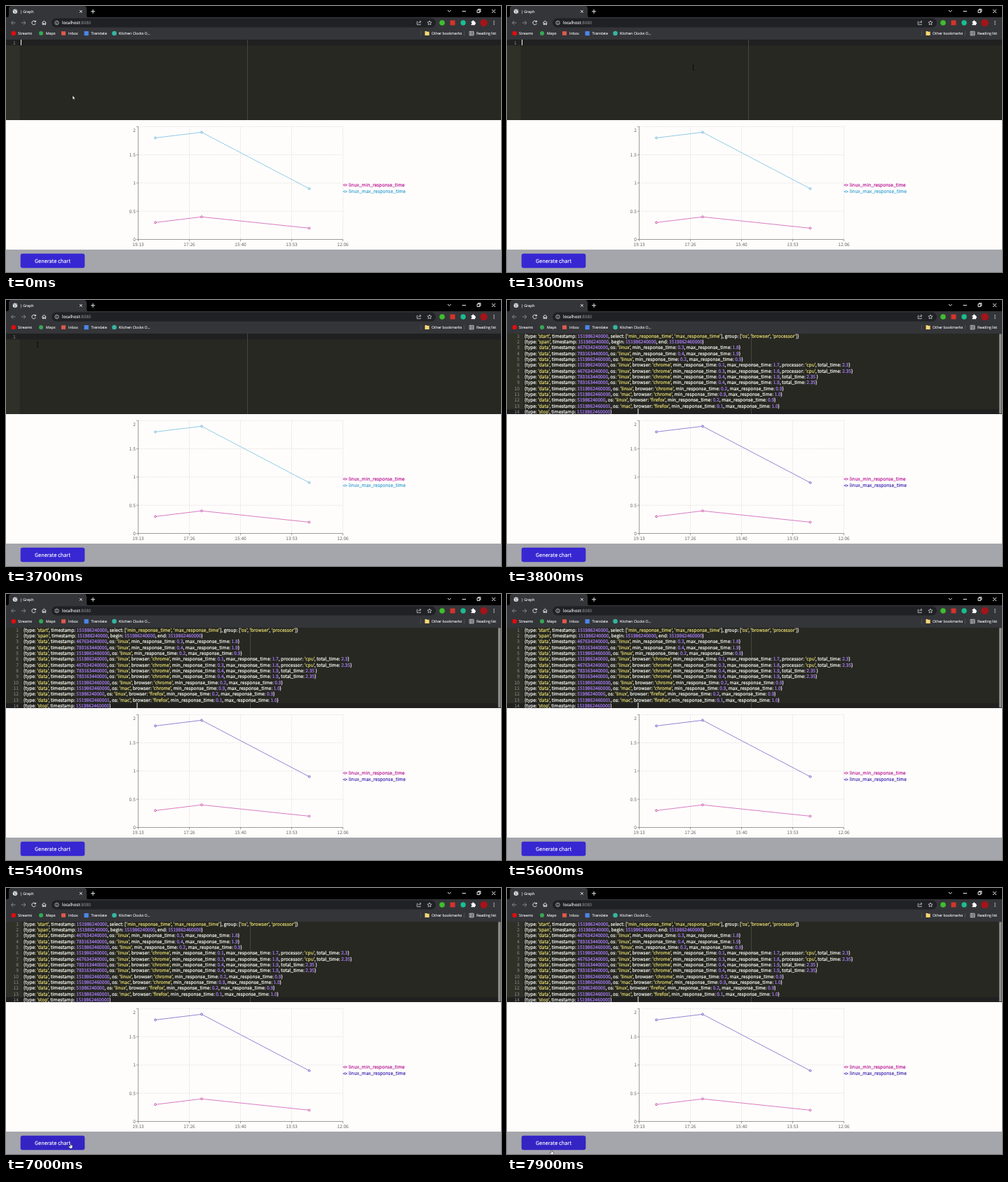
These frames come from a looping animation (706x380 px, 8000 ms). An HTML page:

```html
<!DOCTYPE html>
<html lang="en">
<head>
<meta charset="utf-8">
<title>Graph</title>
<style>
html, body { margin: 0; width: 100%; height: 100%; overflow: hidden; background: #000; }
svg { display: block; width: 100%; height: 100%; }
text { white-space: pre; text-rendering: geometricPrecision; }
.ui { font: 5.25px "Open Sans", "Noto Sans", sans-serif; fill: #f0f1f3; stroke: #f0f1f3; stroke-width: .12; }
.app { font: 6.58px "Noto Sans CJK JP", "Noto Sans CJK SC", "Noto Sans CJK", "Noto Sans", sans-serif; }
#code { stroke-width: .2; }
.icon { fill: none; stroke: #e8e9eb; stroke-width: 1; }
</style>
</head>
<body>
<svg id="stage" viewBox="0 0 706 380">
  <rect width="706" height="380" fill="#000"/>
  <!-- browser -->
  <path d="M0 16H2Q4 16 4 13V4Q4 0 8 0H111Q115 0 115 4V13Q115 16 117 16H706V48H0Z" fill="#343539"/>
  <rect x="65" y="17.5" width="548" height="13" rx="6.5" fill="#202124"/>
  <g class="ui" id="labels"></g>
  <circle cx="13" cy="7.8" r="3.3" fill="#e4e5e8"/>
  <path d="M10.5 6l2 1 .5 2-1 1.5M13.5 5l1 1.5 1.5.5M14 9l1.2 1" fill="none" stroke="#55575c" stroke-width=".8"/>
  <g class="icon">
    <path d="M105 6l3.6 3.6M108.600 6l-3.600 3.600M121 7.800h6M124 4.800v6"/>
    <path d="M630 6l2.300 2.300 2.300-2.300M650.500 7.500h5.500M672 5.800h3.700v3.700h-3.700zM673.300 5.800v-1.300h3.600v3.700h-1.200M693 5l5 5M698 5l-5 5"/>
    <path d="M13.500 24H7.500M10.300 21.200L7.500 24l2.800 2.800M22 24h6M25.200 21.200L28 24l-2.800 2.800" stroke="#85878c"/>
    <path d="M42 22.400A2.800 2.800 0 1 0 42.300 25M42.400 20.800v2h-2M51.300 24l3-2.700 3 2.700M52.200 23.600v3h1.400v-1.700h1.400v1.700h1.400v-3"/>
    <circle cx="72.500" cy="24" r="2.700" stroke-width=".7"/>
    <path d="M72.500 23.700v1.800M72.500 22.400v.7" stroke-width=".7"/>
    <path d="M587.500 22.300h-1.300v4.400h5v-1.200M588 24.800q.4-2.300 3.700-2.300M590.200 20.900l1.800 1.600-1.800 1.600" stroke-width=".7"/>
    <path d="M604 21l.9 2 2.200.2-1.700 1.500.5 2.200-1.900-1.200-1.900 1.200.5-2.200-1.700-1.500 2.200-.2z" stroke-width=".7"/>
  </g>
  <circle cx="622" cy="24" r="3.800" fill="#3fbe2e"/>
  <rect x="633.500" y="20.500" width="7" height="7" fill="#d3342c"/>
  <circle cx="652" cy="24" r="3.700" fill="#19bd91"/>
  <path d="M663.500 22h1.700a1.100 1.100 0 1 1 2.100 0h1.700v1.600a1.100 1.100 0 1 1 0 2.200v1.500h-5.500v-1.500a1.100 1.100 0 1 0 0-2.200z" fill="#fff"/>
  <circle cx="681.500" cy="24" r="5.200" fill="#a41419"/>
  <g fill="#e8e9eb"><circle cx="696" cy="21.700" r=".7"/><circle cx="696" cy="24" r=".7"/><circle cx="696" cy="26.300" r=".7"/></g>
  <circle cx="10.800" cy="39" r="3.200" fill="#e00d0d"/>
  <circle cx="50" cy="39" r="3" fill="#35a853"/>
  <rect x="79" y="36.200" width="6" height="5.600" fill="#e2584d"/>
  <rect x="111.500" y="36" width="6.200" height="6.200" fill="#4a86e8"/>
  <circle cx="154.500" cy="39" r="3.300" fill="#35b5a0"/>
  <path d="M591.500 35.500v7M653.500 35.500v7" stroke="#5d5f64" stroke-width=".6"/>
  <path d="M597.500 36h2.500l.6.800h3v5.200h-6.100z" fill="#f7d774"/>
  <path d="M661 36.300h6v5.600h-6zM662.800 36.300v5.600M662.800 38.200h4.200M662.800 40.100h4.200" class="icon" style="stroke-width:.7"/>
  <!-- editor -->
  <svg y="48" width="706" height="115" viewBox="0 48 706 115">
    <rect y="48" width="706" height="115" fill="#272822"/>
    <rect id="gutter" y="48" height="115" fill="#2f3129"/>
    <rect id="active" width="706" height="8.300" fill="#202020"/>
    <rect id="margin" y="48" width="1" height="115" fill="#45463f"/>
    <g class="app" id="empty"></g>
    <g class="app" id="code"></g>
    <rect id="caret" width="1" height="8.300" fill="#f8f8f0"/>
    <g id="bar"><rect x="701.500" y="48" width="4.500" height="115" fill="#3a3b38"/><rect x="702" y="48.500" width="3.500" height="113.500" rx="1" fill="#8c8c8a"/></g>
  </svg>
  <!-- page -->
  <rect y="163" width="706" height="185" fill="#fefdfc"/>
  <g class="app" id="chart"></g>
  <rect y="348" width="706" height="32" fill="#a5a6ab"/>
  <rect id="button" x="20.700" y="353.700" width="91.600" height="20.600" rx="3"/>
  <text class="app" x="66.500" y="367.100" text-anchor="middle" fill="#fff" stroke="#fff" stroke-width=".1" style="font-size:7.400px">Generate chart</text>
  <!-- pointers -->
  <path id="arrow" d="M0 0V5.400L1.300 4.300 2.100 6.200 3 5.800 2.200 4H3.800Z" fill="#fff" stroke="#111" stroke-width=".4"/>
  <path id="beam" d="M-1.300-3.500H1.300M0-3.500V3.500M-1.300 3.500H1.300" fill="none" stroke="#080808" stroke-width=".7"/>
  <path id="hand" d="M-.6-3.200Q0-3.800.6-3.200V-.8L2.700-.2Q3.200 0 3 .8L2.400 4H-1.200L-2.900 1Q-2.600.2-1.600.8L-.6 1.400Z" fill="#fff" stroke="#111" stroke-width=".5"/>
</svg>
<script>
const $ = id => document.getElementById(id);
const LOOP = 8000, PASTE = 3800, LINE = 8.33;

function add(parent, tag, attrs, text) {
  const el = document.createElementNS('http://www.w3.org/2000/svg', tag);
  for (const k in attrs) el.setAttribute(k, attrs[k]);
  if (text !== undefined) el.textContent = text;
  parent.appendChild(el);
  return el;
}
const set = (id, attrs) => { for (const k in attrs) $(id).setAttribute(k, attrs[k]); };
const show = (id, on) => set(id, { visibility: on ? 'visible' : 'hidden' });

// Browser labels
[[20, 9.8, '| Graph'], [17, 41, 'Streams'], [57, 41, 'Maps'], [89, 41, 'Inbox'], [121.5, 41, 'Translate'],
 [161, 41, 'Kitchen Clocks O...'], [607, 41, 'Other bookmarks'], [671, 41, 'Reading list']
].forEach(([x, y, s]) => add($('labels'), 'text', { x, y }, s));
const url = add($('labels'), 'text', { x: 80, y: 26.2, style: 'font-size:6.1px' });
add(url, 'tspan', {}, 'localhost');
add(url, 'tspan', { fill: '#9aa0a6', stroke: 'none' }, ':8080');

// Editor content
const row = (time, os, browser, min, max, rest = '') =>
  `{type: 'data', timestamp: ${time}, os: '${os}', ${browser ? `browser: '${browser}', ` : ''}` +
  `min_response_time: ${min}, max_response_time: ${max}${rest}}`;
const A = '151986240000', B = '1519862460000', C = '467634240000', D = '783163440000';
const lines = [
  `{type: 'start', timestamp: ${A}, select: ['min_response_time', 'max_response_time'], group: ['os', 'browser', 'processor']}`,
  `{type: 'span', timestamp: ${A}, begin: ${A}, end: ${B}}`,
  row(C, 'linux', '', '0.3', '1.8'),
  row(D, 'linux', '', '0.4', '1.9'),
  row(B, 'linux', '', '0.2', '0.9'),
  row(A, 'linux', 'chrome', '0.1', '1.7', ", processor: 'cpu', total_time: 2.3"),
  row(C, 'linux', 'chrome', '0.3', '1.8', ", processor: 'cpu', total_time: 2.35"),
  row(D, 'linux', 'chrome', '0.4', '1.9', ', total_time: 2.35 '),
  row(D, 'linux', 'chrome', '0.4', '1.9', ', total_time: 2.35'),
  row(B, 'linux', 'chrome', '0.2', '0.9'),
  row(B, 'mac', 'chrome', '0.9', '1.0'),
  row('51986240000', 'linux', 'firefox', '0.2', '0.9'),
  row('1519862460001', 'mac', 'firefox', '0.1', '1.0'),
  `{type: 'stop', timestamp: ${B}}`
];
const number = (parent, x, y, n) =>
  add(parent, 'text', { x, y, fill: '#8f908a', 'text-anchor': 'end' }, n);
const colour = s => s[0] === "'" ? '#e6db74' : /^\d/.test(s) ? '#ae81ff' : '#f8f8f2';

number($('empty'), 13.6, 54.7, 1);
lines.forEach((line, i) => {
  const y = 53.7 + i * LINE;
  number($('code'), 17.8, y, i + 1);
  const text = add($('code'), 'text', { x: 25, y });
  for (const s of line.match(/'[^']*'|\d[\d.]*|[^'\d]+/g))
    add(text, 'tspan', { fill: colour(s), stroke: colour(s) }, s);
});

// Chart
const chart = $('chart'), X0 = 188.5, X1 = 480.5, Y0 = 333.5, UNIT = 80.6;
const py = v => Y0 - v * UNIT;
const stroke = (d, color, extra) =>
  add(chart, 'path', { d, fill: 'none', stroke: color, 'stroke-width': .6, ...extra });
const dash = { 'stroke-dasharray': '1.4 1.4' };
const times = ['19:13', '17:26', '15:40', '13:53', '12:06'];

for (let i = 0; i < 5; i++) {
  const x = X0 + i * 73, v = i / 2;
  stroke(`M${x} ${py(2)}V${Y0}`, '#cfcdcb', dash);
  stroke(`M${X0} ${py(v)}H${X1}`, '#cfcdcb', dash);
  stroke(`M${x} ${Y0}v2.7M${X0} ${py(v)}h-2.700`, '#666');
  add(chart, 'text', { x, y: 342.7, fill: '#666', 'text-anchor': 'middle' }, times[i]);
  add(chart, 'text', { x: 185, y: v === 2 ? 179.6 : py(v) + 2.500, fill: '#666', 'text-anchor': 'end' }, v);
}
stroke(`M${X0} ${py(2)}V${Y0}H${X1}`, '#666');

function series(name, values, color, legendY) {
  const pts = [213, 279, 432.5].map((x, i) => [x, py(values[i])]);
  const dot = ([x, y]) => add(chart, 'circle',
    { cx: x, cy: y, r: 1.4, fill: '#fff', stroke: color, 'stroke-width': .7 });
  stroke('M' + pts.join('L'), color, { 'stroke-width': .55 });
  pts.forEach(dot);
  stroke(`M480.500 ${legendY}h6.400`, color, { 'stroke-width': .9 });
  dot([483.7, legendY]);
  add(chart, 'text', { x: 488.7, y: legendY + 2.2, fill: color, stroke: color, 'stroke-width': .15 }, name);
}
series('linux_min_response_time', [.3, .4, .2], '#b8108f', 255.8);
series('linux_max_response_time', [1.8, 1.9, .9], 'var(--max)', 265.1);

// Pointer way points: time, x, y
const path = [
  [0, 95, 128], [100, 95, 131], [600, 95, 131], [1300, 265.5, 88], [1500, 265.5, 88], [1700, 254, 69],
  [2000, 200, 66], [2400, 45, 63.5], [4300, 45, 63.5], [5400, 329, 151], [6000, 329, 151],
  [6300, 289, 162], [7000, 92, 368], [7900, 63.5, 377.5], [LOOP, 63.5, 377.5]
];
function pointer(t) {
  const i = Math.max(1, path.findIndex(p => p[0] > t));
  const [a, x, y] = path[i - 1], [b, u, v] = path[i];
  const k = (t - a) / (b - a), e = k * k * (3 - 2 * k);
  return [x + (u - x) * e, y + (v - y) * e];
}

const within = (t, a, b) => t >= a && t < b;
function caretOn(t) {
  if (t < PASTE) return t < 700 || within(t, 1100, 1600) || within(t, 2100, 2700) || within(t, 3100, 3700);
  return t < 4100 || (t - 400) % 1000 < 600;
}

function draw(t) {
  const full = t >= PASTE;
  show('code', full);
  show('bar', full);
  show('empty', !full);
  set('gutter', { width: full ? 23 : 19.4 });
  set('active', { y: full ? 47.7 + 13 * LINE : 48 });
  set('margin', { x: full ? 348 : 344 });
  set('caret', { x: full ? 186.5 : 21, y: full ? 155 : 47.8 });
  show('caret', caretOn(t));
  chart.style.setProperty('--max', full ? '#3a22ad' : '#38a0d2');

  const [x, y] = pointer(t);
  const hover = x > 20 && x < 113 && y > 354;
  const shape = hover ? 'hand' : t < 100 || y > 163 ? 'arrow' : 'beam';
  for (const id of ['arrow', 'beam', 'hand']) show(id, id === shape);
  set(shape, { transform: `translate(${x} ${y})` });
  set('button', { fill: hover ? '#3424c4' : '#3727d2' });
}

let start;
function tick(now) {
  start ??= now;
  draw((now - start) % LOOP);
  requestAnimationFrame(tick);
}
draw(0);
requestAnimationFrame(tick);
</script>
</body>
</html>
```
